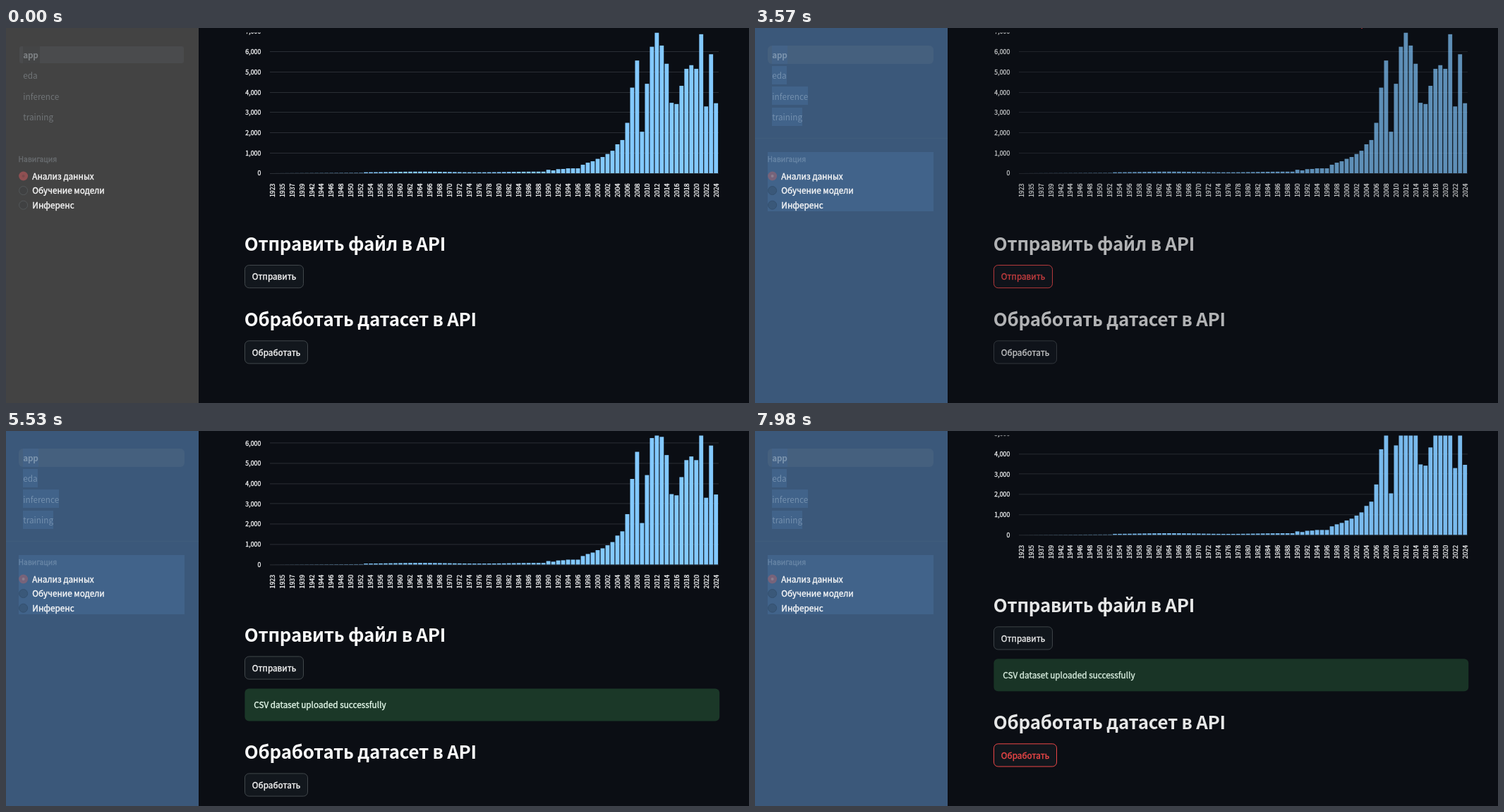
An HTML page with a canvas for the animation above (8 s loop, 1053 px wide and 532 px high).

```html
<!DOCTYPE html>
<html lang="ru">
<head>
<meta charset="utf-8">
<style>
  html, body { margin: 0; height: 100%; overflow: hidden; background: #0b0e14; }
  canvas { display: block; }
</style>
</head>
<body>
<canvas id="stage" width="1053" height="532"></canvas>
<script>
const ctx = document.getElementById('stage').getContext('2d');
const LOOP = 8000, TICK = 70;
const FAMILY = '"Noto Sans CJK JP", "Noto Sans CJK SC", "Noto Sans", sans-serif';
const RED = '#ff4b4b', WHITE = '#fafafa', BG = '#0b0e14';

// Moments of the session, in ms
const SELECT = 1120, RERUN = 2940, FRESH = 3850, UPLOADED = 4130, UNHOVER = 5040, RERUN2 = 7700;
const SUCCESS_SHIFT = 58.7;

const clamp = x => Math.min(1, Math.max(0, x));
const between = (t, a, b) => t >= a && t < b;

// Weight 500 is regular with a hairline outline; 700 is tightened to look semibold
function text(str, x, y, size, color, weight = 500, align = 'left') {
  ctx.font = `${weight === 700 ? 700 : 400} ${size}px ${FAMILY}`;
  ctx.letterSpacing = weight === 700 ? '-0.25px' : '0px';
  ctx.textAlign = align;
  ctx.fillStyle = ctx.strokeStyle = color;
  ctx.fillText(str, x, y);
  if (weight === 500) {
    ctx.lineWidth = 0.35;
    ctx.strokeText(str, x, y);
  }
}

function rect(x, y, w, h, color) {
  ctx.fillStyle = color;
  ctx.fillRect(x, y, w, h);
}

function paint(fill, stroke) {
  ctx.fillStyle = fill;
  ctx.fill();
  if (stroke) {
    ctx.lineWidth = 1;
    ctx.strokeStyle = stroke;
    ctx.stroke();
  }
}

function roundRect(x, y, w, h, r, fill, stroke) {
  ctx.beginPath();
  ctx.roundRect(x, y, w, h, r);
  paint(fill, stroke);
}

function dot(x, y, r, fill, stroke) {
  ctx.beginPath();
  ctx.arc(x, y, r, 0, 7);
  paint(fill, stroke);
}

// Chart data: near-empty early years, then the growth years one by one
const recent = [170, 140, 200, 210, 240, 240, 240, 420, 520, 590, 710, 800, 950, 1110, 1430,
  1640, 2490, 4230, 5570, 2050, 4420, 6250, 6950, 6310, 5410, 3480, 3420, 4320, 5160, 5340,
  5160, 6870, 3300, 5880, 3460];
const early = Array.from({ length: 56 }, (_, i) => i < 19 ? i * 0.9 : 62 + 16 * Math.sin((i - 24) / 3.8));
const values = [...early, ...recent];
const years = [1923, 1935, 1937, 1939];
for (let y = 1942; y <= 2024; y += 2) years.push(y);

function drawChart() {
  const zero = 206, unit = 28.7, left = 377.3, step = 6.988;
  for (let k = 0; k <= 7; k++) {
    const y = zero - k * unit;
    rect(374, Math.floor(y), 636, 1, '#2a2e35');
    text(k ? k + ',000' : '0', 361.3, y + 3.3, 8.8, '#f2f3f4', 500, 'right');
  }
  values.forEach((v, i) => {
    const h = v / 1000 * unit;
    rect(left + i * step - 2.9, zero - h, 5.8, h, '#83c9ff');
  });
  years.forEach((year, i) => {
    ctx.save();
    ctx.translate(left + i * 2 * step + 3.3, 220.5);
    ctx.rotate(-Math.PI / 2);
    text(year, 0, 0, 8.8, '#f2f3f4', 500, 'right');
    ctx.restore();
  });
}

function drawLink(x, y) {
  ctx.strokeStyle = '#a3a5a9';
  ctx.lineWidth = 1.3;
  ctx.beginPath();
  ctx.moveTo(x - 1, y - 3.3);
  ctx.lineTo(x - 3, y - 3.3);
  ctx.arc(x - 3, y, 3.3, -Math.PI / 2, Math.PI / 2, true);
  ctx.lineTo(x - 1, y + 3.3);
  ctx.moveTo(x + 1, y - 3.3);
  ctx.lineTo(x + 3, y - 3.3);
  ctx.arc(x + 3, y, 3.3, -Math.PI / 2, Math.PI / 2);
  ctx.lineTo(x + 1, y + 3.3);
  ctx.moveTo(x - 3, y);
  ctx.lineTo(x + 3, y);
  ctx.stroke();
}

const buttonStyles = {
  normal: ['#12171d', '#41474b', WHITE],
  focus: ['#12171d', RED, RED],
  active: [RED, RED, WHITE],
};

function drawSection(title, label, width, y, state) {
  text(title, 337.8, y, 25.9, WHITE, 700);
  const [fill, border, color] = buttonStyles[state];
  roundRect(338.5, y + 20.5, width, 32.2, 6, fill, border);
  text(label, 338.5 + width / 2, y + 41.2, 11.75, color, 500, 'center');
}

function drawSidebar(selected) {
  const c = selected
    ? { bg: '#3b587a', row: '#45607e', mark: '#41638a', app: '#7c94ad', link: '#7490ae',
        title: '#6886a6', ring: '#34506f', off: '#3a5879', on: '#77637a', core: '#8a7f8f' }
    : { bg: '#434343', row: '#4a4b4d', mark: '#444546', app: '#7e8285', link: '#717578',
        title: '#686c6f', ring: '#54585a', off: '#404142', on: '#8f5052', core: '#7a4a4c' };
  rect(0, 0, 273, 532, c.bg);
  if (selected) {
    roundRect(18, 25, 235, 26, 6, c.row);
    rect(24, 25, 22, 26, '#436287');
    [[54, 21], [83, 51], [113, 43]].forEach(([y, w]) => rect(24, y, w, 26, c.mark));
    rect(0, 156, 273, 1, '#405d7c');
    rect(18, 176, 235, 84, c.mark);
  } else {
    roundRect(19, 26, 233, 24, 3, c.row);
    rect(24, 26, 24, 24, c.mark);
  }
  text('app', 24.3, 42.5, 11.75, c.app, 700);
  ['eda', 'inference', 'training'].forEach((name, i) =>
    text(name, 24.3, 72 + i * 29.5, 11.75, c.link, 400));
  text('Навигация', 17.6, 190, 10.3, c.title);
  ['Анализ данных', 'Обучение модели', 'Инференс'].forEach((name, i) => {
    const y = 210 + i * 20.6;
    if (i) dot(24.6, y, 6, c.off, c.ring);
    else {
      dot(24.6, y, 6.5, c.on);
      dot(24.6, y, 2, c.core);
    }
    text(name, 37.3, y + 4.5, 11.75, WHITE);
  });
}

// Staleness fade: ease-in to a third of full opacity over one second
const stale = (t, start) => 1 - 0.67 * Math.pow(clamp((t - start) / 1000), 1.7);

function scrollAt(t) {
  if (t < 5740) {
    const p = clamp((t - 5460) / 210);
    return 64 * p * p * (3 - 2 * p);
  }
  return SUCCESS_SHIFT + 5.3 * (1 - clamp((t - 5740) / 420));
}

function sendState(t) {
  if (between(t, SELECT, 1260) || between(t, 2170, 2380)) return 'active';
  return between(t, SELECT, FRESH) ? 'focus' : 'normal';
}

function processState(t) {
  if (between(t, 7000, 7140)) return 'active';
  return t >= 6370 ? 'focus' : 'normal';
}

function draw(t) {
  rect(0, 0, 1053, 532, BG);
  drawSidebar(t >= SELECT);

  const uploaded = t >= UPLOADED;
  const fadeUntil = end => t >= RERUN2 ? stale(t, RERUN2) : t < end ? stale(t, RERUN) : 1;
  ctx.save();
  ctx.beginPath();
  ctx.rect(273, 6.5, 780, 526);
  ctx.clip();
  ctx.translate(0, -scrollAt(t));

  ctx.globalAlpha = fadeUntil(FRESH);
  drawChart();
  drawSection('Отправить файл в API', 'Отправить', 83, 316, sendState(t));
  if (between(t, FRESH, UNHOVER)) drawLink(637, 309);
  if (uploaded) {
    roundRect(338.4, 382, 672.8, 46, 6, '#1b3828');
    text('CSV dataset uploaded successfully', 351.2, 410, 11.75, '#e4f8ea');
  }

  ctx.globalAlpha = fadeUntil(UPLOADED);
  const y = 423.3 + (uploaded ? SUCCESS_SHIFT : 0);
  drawSection('Обработать датасет в API', 'Обработать', 89, y, processState(t));
  if (between(t, 5740, 6370)) drawLink(680, y - 7.2);
  ctx.restore();

  if (between(t, 3010, FRESH)) rect(859, 0, 2, 1, '#8c2a2f');
}

function frame(now) {
  draw(Math.floor(now % LOOP / TICK) * TICK);
  requestAnimationFrame(frame);
}
requestAnimationFrame(frame);
</script>
</body>
</html>
```
